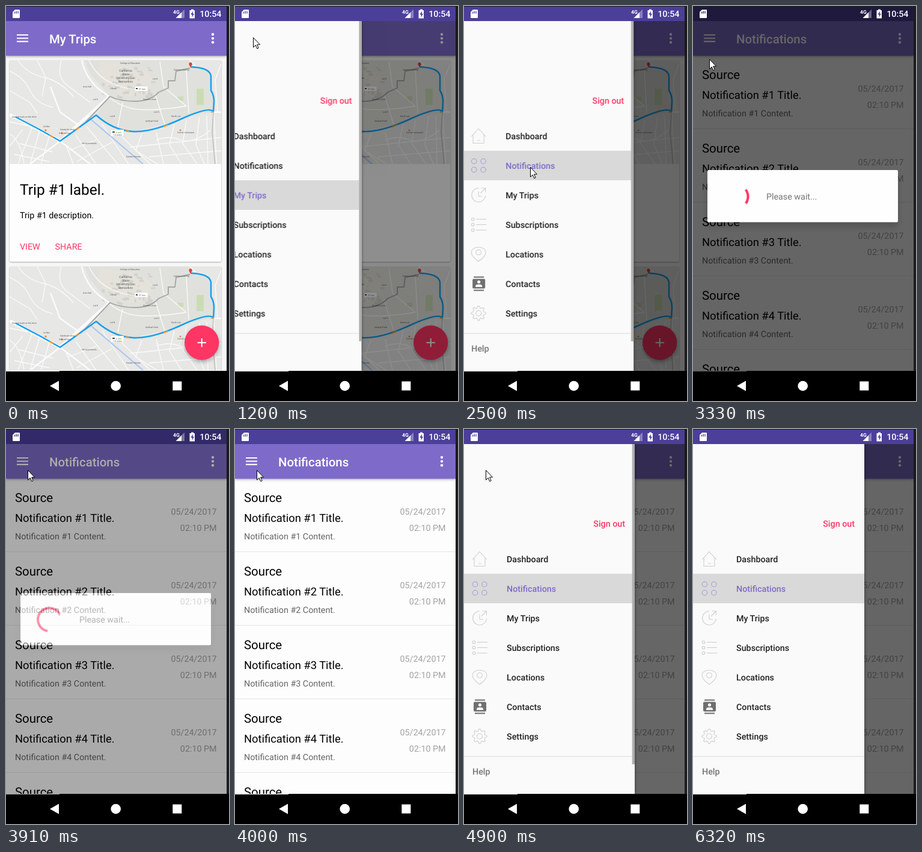
Animation of 371x655 px, one loop 6630 ms. Source, as an HTML page:

```html
<!DOCTYPE html>
<html lang="en">
<head>
<meta charset="utf-8">
<title>Trips app</title>
<style>
html, body { margin: 0; width: 100%; height: 100%; overflow: hidden; background: #000; }
svg { display: block; font: 14.3px Roboto, sans-serif; }
text { white-space: pre; text-rendering: geometricPrecision; }
.med { font-weight: 500; }
.end { text-anchor: end; }
.accent { fill: #ff3564; }
.line { fill: none; stroke: #cfcfcf; stroke-width: 1.1; }
.sel .line { stroke: #a79bdb; }
.row text { fill: #222; font-weight: 500; }
.row.sel text { fill: #7e6bc9; }
.bar { filter: drop-shadow(0 1px 2px rgba(0,0,0,.35)); }
.card { fill: #fdfdfd; filter: drop-shadow(0 1px 1.3px rgba(0,0,0,.32)); }
.fab { filter: drop-shadow(0 3px 3px rgba(0,0,0,.3)); }
.box { filter: drop-shadow(0 8px 6px rgba(0,0,0,.18)); }
.road { fill: none; stroke: #fbfbfb; }
.map text { font-size: 3.6px; fill: #555; }

.drawer, .scrim, .bar-v, .dialog, .arc, .cursor, .trips, .notes, .was, .now {
  animation: 6630ms linear infinite;
}
.trips { animation-name: trips; }
.notes { animation-name: notes; }
.was { animation-name: was; }
.now { animation-name: now; }
.trips, .notes, .was, .now { animation-timing-function: step-end; }
.drawer { animation-name: slide; }
.scrim { animation-name: shade; }
.bar-v { animation-name: bar; }
.dialog { animation-name: dialog; }
.arc { animation-name: spin, sweep; transform-origin: 72.3px 316px; }
.cursor { animation-name: point; }

@keyframes trips { 0% { opacity: 1 } 38.3%, 100% { opacity: 0 } }
@keyframes notes { 0% { opacity: 0 } 38.3%, 100% { opacity: 1 } }
@keyframes was { 0% { opacity: 1 } 37.7%, 100% { opacity: 0 } }
@keyframes now { 0% { opacity: 0 } 37.7%, 100% { opacity: 1 } }
@keyframes slide {
  0% { transform: translateX(-300px) }
  16.06% { transform: translateX(-285px); animation-timing-function: cubic-bezier(.22,1,.36,1) }
  24.84% { transform: translateX(0); animation-timing-function: step-end }
  37.7%, 38.01% { transform: translateX(-2.8px); animation-timing-function: cubic-bezier(.22,1,.36,1) }
  45.7% { transform: translateX(-285px); animation-timing-function: step-end }
  45.71% { transform: translateX(-300px); animation-timing-function: step-end }
  69.15% { transform: translateX(-285px); animation-timing-function: cubic-bezier(.22,1,.36,1) }
  75.57%, 100% { transform: translateX(0) }
}
@keyframes shade {
  0%, 16.06% { opacity: 0; animation-timing-function: cubic-bezier(.22,1,.36,1) }
  24.84% { opacity: 1; animation-timing-function: step-end }
  37.7%, 38.01% { opacity: .99; animation-timing-function: cubic-bezier(.22,1,.36,1) }
  45.7%, 69.15% { opacity: 0; animation-timing-function: cubic-bezier(.22,1,.36,1) }
  75.57%, 100% { opacity: 1 }
}
@keyframes bar { 0%, 92.7% { opacity: 1 } 95.2%, 100% { opacity: 0 } }
@keyframes dialog { 0%, 44.2% { opacity: 0 } 47.2%, 57.95% { opacity: 1 } 60.25%, 100% { opacity: 0 } }
@keyframes spin { 0%, 46.71% { transform: rotate(-78deg) } 60.33%, 100% { transform: rotate(80.5deg) } }
@keyframes sweep {
  0%, 46.8% { stroke-dasharray: 8 360; stroke-dashoffset: 0; animation-timing-function: ease-in-out }
  56.77% { stroke-dasharray: 270 360; stroke-dashoffset: 0; animation-timing-function: ease-in }
  60.33%, 100% { stroke-dasharray: 195 360; stroke-dashoffset: -75 }
}
@keyframes point {
  0% { transform: translate(-30px,42px); animation-timing-function: step-end }
  6.48% { transform: translate(-8px,42px); animation-timing-function: ease-out }
  12.07%, 24.13% { transform: translate(30px,52px); animation-timing-function: ease-in }
  26.55% { transform: translate(101px,180px); animation-timing-function: ease-out }
  29.71%, 40.72% { transform: translate(110px,267px); animation-timing-function: ease-in-out }
  48.11% { transform: translate(29px,99px) }
  50.15%, 50.68% { transform: translate(27px,88px); animation-timing-function: ease-in-out }
  57.77%, 76.17% { transform: translate(36px,68px); animation-timing-function: ease-in }
  79.19% { transform: translate(127px,121px) }
  82.2% { transform: translate(205px,400px) }
  85.06% { transform: translate(254px,627px); animation-timing-function: step-end }
  85.07%, 100% { transform: translate(-30px,42px) }
}
</style>
</head>
<body>
<svg width="371" height="655" viewBox="0 0 371 655">
<defs>
  <clipPath id="frame"><path d="M6 90H358V262H6z"/></clipPath>
  <g id="map" class="map" clip-path="url(#frame)">
    <path fill="#e7e7e6" d="M6 90H358V262H6z"/>
    <path fill="#e0e1dc" d="M130 90H306L312 101Q340 102 341 122L346 176Q318 178 290 188T210 208Q178 206 150 181L172 150 140 112z"/>
    <path fill="#e4e2da" d="M158 92L196 97 232 108 246 122 238 142 214 150 190 148 168 134 150 112z"/>
    <g id="blocks" fill="#d2d2cb"></g>
    <path fill="#cbdcb4" d="M317 137h12v27h-12zM286 150h9v7h-9z"/>
    <g class="road" stroke-width="1.3">
      <path d="M6 108Q30 118 40 140T78 168M20 90Q34 112 62 118T112 150M52 90L66 118 60 150M92 90Q84 116 100 130L140 160M6 140L40 160 52 178M28 205L6 232M6 212Q24 222 30 262M44 200L20 262M56 207L40 262M72 216L58 262M22 228L78 242M14 246L72 258M6 192L44 200"/>
      <path d="M100 232L112 262M116 214L150 262M134 200L186 262M104 240L150 222M118 258L176 226M160 196L170 212 204 262M190 214L240 262M226 212L216 240 252 262M250 210L262 262M280 196L272 230 292 262M300 190L294 228 318 262M322 184L316 230 330 262M206 234L358 218M238 250L358 240"/>
      <path d="M250 222Q270 214 290 222T340 206M346 178L350 262M334 182L336 262M358 96L348 122 352 176M306 90L316 100M138 90Q150 116 176 128T236 140M170 150Q196 172 230 172T300 166M256 92L262 134 300 166M300 106L304 178M248 146L264 196M194 160L186 200"/>
    </g>
    <path class="road" stroke-width="2.4" d="M126 90Q134 128 172 150M74 134L90 176 124 200M90 224L140 262M90 224L40 262M346 176H358"/>
    <path class="road" stroke-width="5" d="M6 180L90 224 172 150"/>
    <path d="M140 187L228 262" stroke="#a9c6f1" stroke-width="2"/>
    <g fill="none" stroke="#a6a6a6" stroke-width="1.9" stroke-linejoin="round">
      <path d="M90 224L131 194 173 150Q190 158 215 158T254 143L270 136V124H281L283 108 306 103"/>
      <path d="M345 176L343 210 348 262" stroke="#bbb" stroke-width="1.5"/>
    </g>
    <path fill="none" stroke="#179fec" stroke-width="2.5" stroke-linejoin="round" d="M16 184L58 206 90 224 150 181Q178 206 210 208T290 188 345 175L346 158Q346 148 341 140V116Q339 102 307 101"/>
    <path d="M72 214l7 4M116 205l6-4M199 207l6 1M262 200l8-3M341 176l4-1" stroke="#f49a2c" stroke-width="2.3"/>
    <g fill="#ee8b3c"><circle cx="66" cy="206" r="1.7"/><circle cx="93" cy="211" r="1.7"/><circle cx="290" cy="206" r="1.5"/></g>
    <path d="M307 102L304.6 97.5A2.7 2.7 0 1 1 309.4 97.5z" fill="#dc4438"/>
    <g fill="#fff" stroke="#ccc" stroke-width=".5"><path d="M214 133h22v8h-22zM174 205h22v11h-22z"/></g>
    <path d="M216 136h3v2h-3zM177 208h4v2h-4z" fill="#444"/>
    <text x="221" y="138.5">37 min</text><text x="183" y="210.5" style="fill:#388e3c">6 min</text><text x="178" y="215">1.8 miles</text>
    <g text-anchor="middle">
      <text x="199" y="109" style="font-size:5px">California</text><text x="199" y="115" style="font-size:5px">State</text>
      <text x="199" y="121" style="font-size:5px">University San</text><text x="199" y="127" style="font-size:5px">Bernardino</text>
    </g>
    <g id="labels"></g>
  </g>
</defs>

<rect width="371" height="655" fill="#1d1d1d"/>

<g class="trips">
  <path fill="#f7f7f7" d="M0 25H367V605H0z"/>
  <g id="cards"></g>
  <g class="fab"><circle class="accent" cx="325.7" cy="558.3" r="28.6"/></g>
  <path d="M318.5 558.3h14.4M325.7 551.1v14.4" stroke="#fff" stroke-width="2"/>
</g>
<g class="notes">
  <path fill="#fdfdfd" d="M0 25H367V605H0z"/>
  <g id="list"></g>
</g>

<path class="bar" fill="#7e6bc9" d="M0 25H367V82.6H0z"/>
<g fill="#fff">
  <path d="M18 47h19v2.1H18zM18 52.4h19v2.1H18zM18 57.8h19v2.1H18z"/>
  <circle cx="344" cy="47" r="2.2"/><circle cx="344" cy="53.6" r="2.2"/><circle cx="344" cy="60.2" r="2.2"/>
  <g class="med" font-size="20.4"><text class="trips" x="72" y="62">My Trips</text><text class="notes" x="72" y="62">Notifications</text></g>
</g>

<path class="scrim" fill="#000" fill-opacity=".6" d="M0 25H367V605H0z"/>
<g class="drawer">
  <path fill="#fafafa" d="M0 25H285V605H0z" style="filter:drop-shadow(1px 0 2px rgba(0,0,0,.35))"/>
  <text class="med end accent" x="269" y="162">Sign out</text>
  <g id="rows"></g>
  <path fill="#dcdcdc" d="M0 542.5H285v1H0z"/>
  <text class="med" x="15" y="573" fill="#757575">Help</text>
  <path class="bar-v" fill="#aeaeae" d="M280.7 25H285V556H280.7z"/>
</g>

<path fill="#4b3f9a" d="M0 1H367V25H0z"/>
<path d="M0 605H371V655H0z"/>
<path fill="#eee" d="M0 605H89v1H0z"/>

<g class="dialog">
  <path fill="#000" fill-opacity=".6" d="M0 1H367V606H0z"/>
  <rect class="box" x="24" y="272" width="317" height="86.5" rx="2" fill="#fefefe"/>
  <circle class="arc" cx="72.3" cy="316" r="19.2" pathLength="360" fill="none" stroke="#ff3564" stroke-width="4"/>
  <text x="122" y="321" fill="#757575">Please wait...</text>
</g>

<g fill="#fff">
  <path fill-rule="evenodd" d="M15 6h7q1 0 1 1v12q0 1-1 1h-10q-1 0-1-1V10zM14 9.5v3h1.3v-3zM16.700 8.500v4h1.300v-4zM19.400 8.500v4h1.300v-4z"/>
  <path d="M282.5 20L297 5.5V20z" opacity=".35"/>
  <path d="M282.5 20L292 10.5V20z"/>
  <text x="278" y="13" font-size="8.5" font-weight="700">4G</text>
  <path d="M308 5.5h4V7h2v13.5h-8.500V7h2.500z"/>
  <path d="M310.8 8.500L307.300 14.300h2.300v4.500l3.400-6h-2.200z" fill="#4b3f9a"/>
  <text class="med end" x="358.5" y="18">10:54</text>
</g>

<path fill="#fff" d="M73 630L88 621.5V638.5zM277.3 622.5h15v15h-15z"/>
<circle cx="182.7" cy="630" r="8.3" fill="#fff"/>

<path class="cursor" fill="#fff" stroke="#000" d="M.5.5V16.5L4.2 13 6.8 18.8 9.2 17.7 6.6 12H11.5z"/>
</svg>
<script>
const put = (id, html) => document.getElementById(id).innerHTML = html;
const each = (n, fn) => Array.from({ length: n }, (_, i) => fn(i)).join('');

let seed = 7;
const rnd = () => (seed = seed * 16807 % 2147483647) / 2147483647;
put('blocks', each(38, () => {
  const x = 160 + rnd() * 84, y = 94 + rnd() * 54;
  return `<rect x="${x}" y="${y}" width="${3 + rnd() * 6}" height="${2 + rnd() * 4}" transform="rotate(${rnd() * 40 - 10} ${x} ${y})"/>`;
}));

const labels = [[10, 185, 'Start of route on the drive'], [279, 107, 'Campus parking'], [190, 96, 'College of Education'],
  [128, 135, 'Arts Hall'], [145, 156, 'Lot E'], [173, 138, 'Library'], [244, 122, 'Lot D'], [228, 156, 'Student Union'],
  [173, 184, 'Lot B'], [246, 177, 'Lot H'], [232, 192, 'Softball Field'], [62, 201, 'Coffee'], [90, 206, 'Sandwich shop'],
  [88, 212, 'Grill and bar'], [126, 229, 'Hill Apartments'], [285, 211, 'Corner restaurant'], [200, 251, 'Garden Homes'], [275, 184, 'North Lot']];
put('labels', labels.map(([x, y, s]) => `<text x="${x}" y="${y}">${s}</text>`).join(''));

put('cards', each(2, i => `<g transform="translate(0 ${i * 342})">
  <rect class="card" x="6" y="90" width="352" height="334" rx="2"/><use href="#map"/>
  <text x="23" y="313" font-size="24.5">Trip #${i + 1} label.</text>
  <text x="23" y="352">Trip #${i + 1} description.</text>
  <g class="accent"><text x="23" y="404">VIEW</text><text x="81.5" y="404">SHARE</text></g></g>`));

put('list', each(5, i => `<g transform="translate(0 ${i * 122})">
  <text x="15" y="121" font-size="20.4">Source</text>
  <text x="15" y="154" font-size="18.35">Notification #${i + 1} Title.</text>
  <text x="15" y="183" fill="#666">Notification #${i + 1} Content.</text>
  <g class="end" fill="#a2a2a2"><text x="350.5" y="142">05/24/2017</text><text x="350.5" y="169">02:10 PM</text></g>
  <path fill="#e6e6e6" d="M0 203H367v1H0z"/></g>`));

const dot = (x, y, r) => `<circle cx="${x}" cy="${y}" r="${r}"/>`;
const path = d => `<path d="${d}"/>`;
const gear = 'M' + Array.from({ length: 32 }, (_, i) => {
  const a = (i - .5) * Math.PI / 16, r = i % 4 < 2 ? 12 : 9;
  return (27 + r * Math.cos(a)).toFixed(1) + ' ' + (r * Math.sin(a)).toFixed(1);
}).join('L') + 'z';

const items = [
  ['Dashboard', path('M15 1L27-12 39 1M18-2V12H36V-2M25 7.5h5')],
  ['Notifications', dot(19.5, -7, 4.2) + dot(34.8, -7, 4.2) + dot(19.5, 7, 4.2) + dot(34.8, 7, 4.2)],
  ['My Trips', path('M27-11.5A11.5 11.5 0 1 0 38.5 1M27-6V2h6M30-3L38.5-11.5M31.5-11.5h7v7')],
  ['Subscriptions', [-9, 0, 9].map(y => dot(17.5, y, 2.3) + path(`M23 ${y}H40`)).join('')],
  ['Locations', path('M27 12C20 7 15 2 15-3C15-8 20-11.5 27-11.5S39-8 39-3C39 2 34 7 27 12z') + dot(27, -3, 4.3)],
  ['Contacts', '<path fill="#6f6f6f" stroke="none" d="M19-12h17v2H19zM19 10h17v2H19zM19-8h17q2 0 2 2V6q0 2-2 2H19q-2 0-2-2V-6q0-2 2-2z"/>' +
    '<g fill="#fafafa" stroke="none">' + dot(27.5, -3, 2.6) + path('M22 5.5V4Q22 1 27.5 1T33 4V5.5z') + '</g>'],
  ['Settings', path(gear) + dot(27, 0, 4.5)]
];
const row = (i, cls) => `<g class="row ${cls}" transform="translate(0 ${215.5 + i * 49})">
  ${cls.includes('sel') ? '<path fill="#d9d9d9" d="M0-24.5H285v49H0z"/>' : ''}
  <g class="line">${items[i][1]}</g><text x="72" y="5">${items[i][0]}</text></g>`;
put('rows', each(7, i =>
  i === 1 ? row(i, 'was') + row(i, 'sel now') :
  i === 2 ? row(i, 'sel was') + row(i, 'now') : row(i, '')));
</script>
</body>
</html>
```
